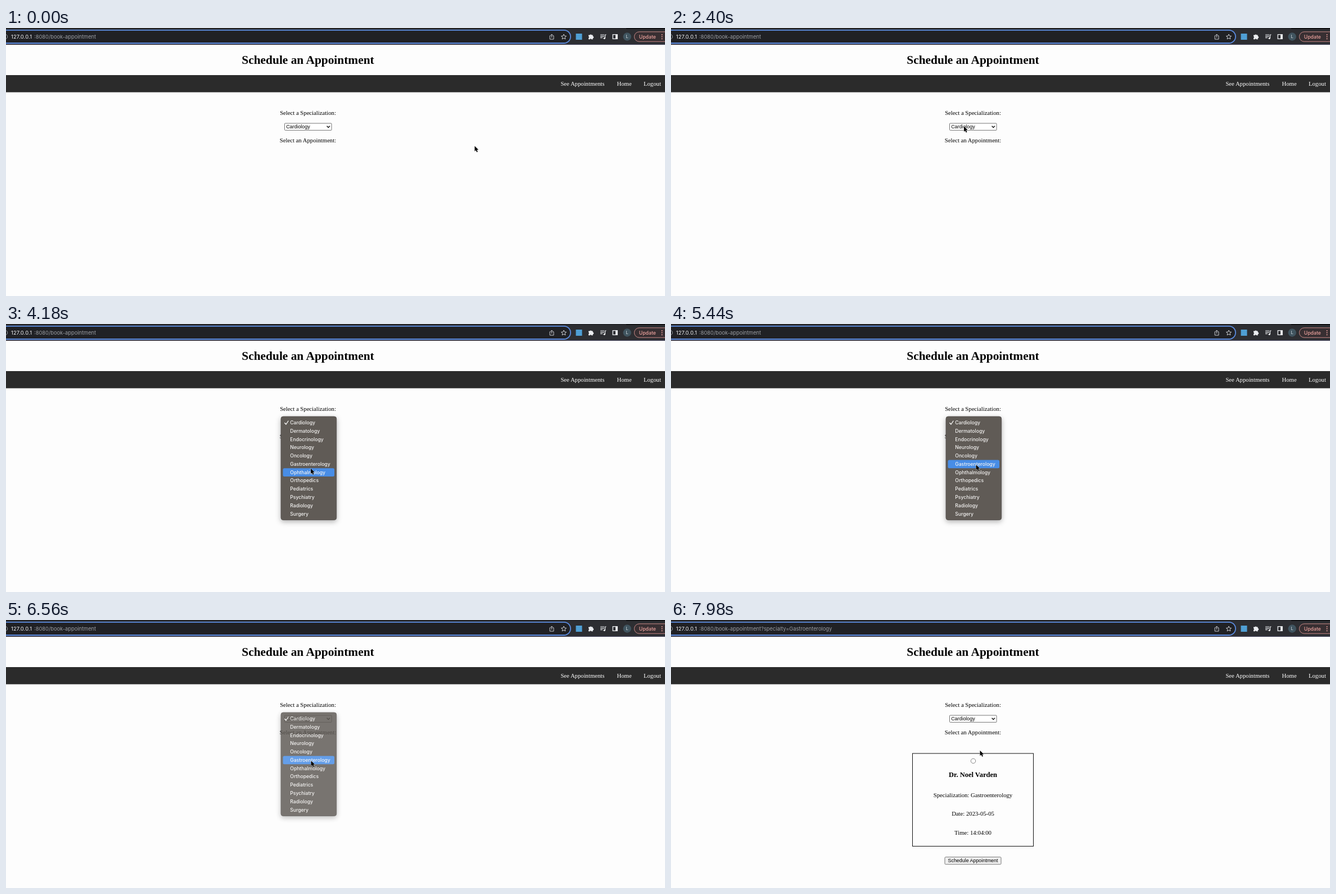
Animation of 1172 by 478 pixels, one loop 8000 ms. Source, as an HTML page:

```html
<!DOCTYPE html>
<html lang="en">
<head>
<meta charset="utf-8">
<title>Schedule an Appointment</title>
<style>
  html, body { margin: 0; width: 100%; height: 100%; overflow: hidden; background: #fdfdfd; }
  svg { display: block; width: 1172px; height: 478px; }
  text { white-space: pre; }
  .page { font: 10.7px "Liberation Serif", Times, serif; }
  .mid { text-anchor: middle; }
  .control { font: 8.9px "Liberation Sans", Arial, sans-serif; }
  .ui { font-family: Inter, sans-serif; }
  #menu { filter: drop-shadow(0 3px 5px rgba(0, 0, 0, .3)); }
</style>
</head>
<body>
<svg viewBox="0 0 1172 478" xmlns="http://www.w3.org/2000/svg">
  <rect width="1172" height="478" fill="#fdfdfd"/>

  <g id="browser" class="ui">
    <rect width="1172" height="30" fill="#2d2e32"/>
    <rect width="1103" height="1.5" fill="#222327"/>
    <rect x="1103" width="69" height="1.5" fill="#08090a"/>
    <rect y="28.7" width="1172" height="1.3" fill="#45455a"/>
    <rect x="-30" y="3.8" width="1034" height="23.2" rx="11.6" fill="#202125" stroke="#5c8ce0" stroke-width="1.8"/>
    <circle cx="-1.5" cy="15.5" r="4.2" fill="none" stroke="#9aa0a6"/>
    <text y="19" font-size="9.3" fill="#9a9da2"><tspan x="9" fill="#f1f2f4" letter-spacing=".2">127.0.0.1</tspan><tspan x="50">:8080/book-appointment</tspan><tspan id="query"></tspan></text>

    <g fill="none" stroke="#c9cbd0" stroke-linejoin="round">
      <path d="M968.8 13.8H967.2V20H974V13.8H972.4M970.6 17V11.2M968.7 13 970.6 11.1 972.5 13"/>
      <path d="M992 11 993.3 14.1 996.6 14.4 994.1 16.6 994.9 19.8 992 18.1 989.1 19.8 989.9 16.6 987.4 14.4 990.7 14.1Z"/>
    </g>
    <rect x="1013.5" y="10" width="11" height="11" fill="#4f9fd4"/>
    <path fill="#eceef1" d="M1036 12.6H1038.4A1.6 1.6 0 0 1 1041.5 12.6H1043.7V14.8A1.6 1.6 0 0 1 1043.7 18V20.2H1041.2A1.4 1.4 0 0 0 1038.5 20.2H1036V17.7A1.4 1.4 0 0 0 1036 15Z"/>
    <path d="M1057 12H1064M1057 14.7H1064M1057 17.4H1061M1065.5 18.3V12H1067.6" fill="none" stroke="#eceef1" stroke-width="1.2"/>
    <circle cx="1064.2" cy="18.3" r="1.6" fill="#eceef1"/>
    <rect x="1079.2" y="11.7" width="8" height="7.6" fill="none" stroke="#eceef1" stroke-width="1.3"/>
    <rect x="1084" y="11.5" width="3.5" height="8" fill="#eceef1"/>
    <circle cx="1104.7" cy="15.5" r="7.2" fill="#40545f"/>
    <text class="mid" x="1104.7" y="18.2" font-size="7.5" fill="#dce5e9">L</text>
    <rect x="1117.4" y="6.8" width="70" height="17.4" rx="8.7" fill="#382f32" stroke="#c98986" stroke-width="1"/>
    <text x="1125.8" y="18.8" font-size="8.7" font-weight="500" fill="#eda39e">Update</text>
    <g fill="#eda39e">
      <circle cx="1166.6" cy="12" r="1"/><circle cx="1166.6" cy="15.6" r="1"/><circle cx="1166.6" cy="19.2" r="1"/>
    </g>
  </g>

  <g class="page">
    <text class="mid" x="537" y="64" font-size="21.4" font-weight="bold">Schedule an Appointment</text>
    <rect y="84" width="1172" height="30.6" fill="#2b2b2b"/>
    <g fill="#fff">
      <text x="986.4" y="102.8">See Appointments</text>
      <text x="1086.5" y="102.8">Home</text>
      <text x="1134" y="102.8">Logout</text>
    </g>
    <text class="mid" x="537" y="155.2">Select a Specialization:</text>
    <text class="mid" x="537" y="204.2">Select an Appointment:</text>
  </g>
  <rect x="495.5" y="170" width="83.5" height="12.4" rx="1" fill="#fff" stroke="#767676"/>
  <text class="control" x="498.2" y="179.3">Cardiology</text>
  <path d="M570.6 174.8 573.3 177.5 576 174.8" fill="none" stroke="#111" stroke-width="1.4"/>

  <g id="result">
    <rect x="429.5" y="238" width="215" height="165.5" fill="none" stroke="#111"/>
    <circle cx="537.5" cy="251.4" r="4.2" fill="#fff" stroke="#767676" stroke-width=".9"/>
    <g class="page mid">
      <text x="537" y="280" font-size="12.5" font-weight="bold">Dr. Noel Varden</text>
      <text x="537" y="315.7">Specialization: Gastroenterology</text>
      <text x="537" y="349.2">Date: 2023-05-05</text>
      <text x="537" y="382.7">Time: 14:04:00</text>
    </g>
    <rect x="487" y="422.8" width="100" height="13" rx="1.5" fill="#efefef" stroke="#767676"/>
    <text class="control mid" x="537" y="432.4">Schedule Appointment</text>
  </g>

  <g id="menu">
    <rect x="489" y="165" width="98.7" height="184.5" rx="4" fill="#605b56" stroke="#514d49" stroke-width=".8"/>
    <rect id="highlight" x="492.5" width="91.5" height="14.8" rx="2.5" fill="#488de6"/>
    <path d="M495.8 176.5 498 179 502 173" fill="none" stroke="#fff" stroke-width="1.3" stroke-linecap="round" stroke-linejoin="round"/>
    <g id="options" class="ui" font-size="8.6" font-weight="500" fill="#f5f4f3"></g>
  </g>

  <path id="cursor" d="M0 0V9.4L2.2 7.4 3.7 10.9 5.4 10.2 3.9 6.8H6.8Z" fill="#000" stroke="#fff" stroke-width=".8" stroke-linejoin="round" paint-order="stroke"/>
</svg>

<script>
const LOOP = 8000, ROW_TOP = 168.6, ROW_HEIGHT = 14.77;
const MENU_OPEN = 2620, FADE_START = 6520, FADE_END = 6780, RESULT_AT = 7640;
const specialties = ['Cardiology', 'Dermatology', 'Endocrinology', 'Neurology', 'Oncology',
  'Gastroenterology', 'Ophthalmology', 'Orthopedics', 'Pediatrics', 'Psychiatry', 'Radiology', 'Surgery'];

// Pointer stops: time, x, y
const stops = [
  [60, 833.5, 210.5], [840, 512, 162], [1300, 514.5, 165], [1700, 514.5, 165],
  [2300, 521, 175.5], [3340, 521, 175.5], [4180, 542, 257.8], [4560, 543, 296],
  [4900, 543, 290], [5350, 542.5, 251], [6850, 542.5, 251], [7600, 549.5, 232.8]
];

const byId = id => document.getElementById(id);
const [query, result, menu, highlight, options, cursor] =
  ['query', 'result', 'menu', 'highlight', 'options', 'cursor'].map(byId);
const clamp = (v, lo, hi) => Math.min(hi, Math.max(lo, v));

specialties.forEach((name, i) => {
  const label = document.createElementNS('http://www.w3.org/2000/svg', 'text');
  label.setAttribute('x', 505.3);
  label.setAttribute('y', 179.1 + i * ROW_HEIGHT);
  label.textContent = name;
  options.append(label);
});

function pointerAt(t) {
  const next = stops.findIndex(s => s[0] > t);
  if (next === 0) return stops[0].slice(1);
  if (next < 0) return stops.at(-1).slice(1);
  const [t0, x0, y0] = stops[next - 1], [t1, x1, y1] = stops[next];
  const k = (t - t0) / (t1 - t0), e = k * k * (3 - 2 * k);
  return [x0 + (x1 - x0) * e, y0 + (y1 - y0) * e];
}

function render(t) {
  const [x, y] = pointerAt(t);
  cursor.setAttribute('transform', `translate(${x} ${y})`);

  const row = clamp(Math.floor((y - ROW_TOP) / ROW_HEIGHT), 0, specialties.length - 1);
  highlight.setAttribute('y', ROW_TOP + row * ROW_HEIGHT);
  menu.style.opacity = t < MENU_OPEN ? 0 : clamp((FADE_END - t) / (FADE_END - FADE_START), 0, 1);

  const loaded = t >= RESULT_AT;
  result.style.display = loaded ? '' : 'none';
  query.textContent = loaded ? '?specialty=Gastroenterology' : '';
}

const start = performance.now();
function tick() {
  render((performance.now() - start) % LOOP);
  requestAnimationFrame(tick);
}
tick();
</script>
</body>
</html>
```
